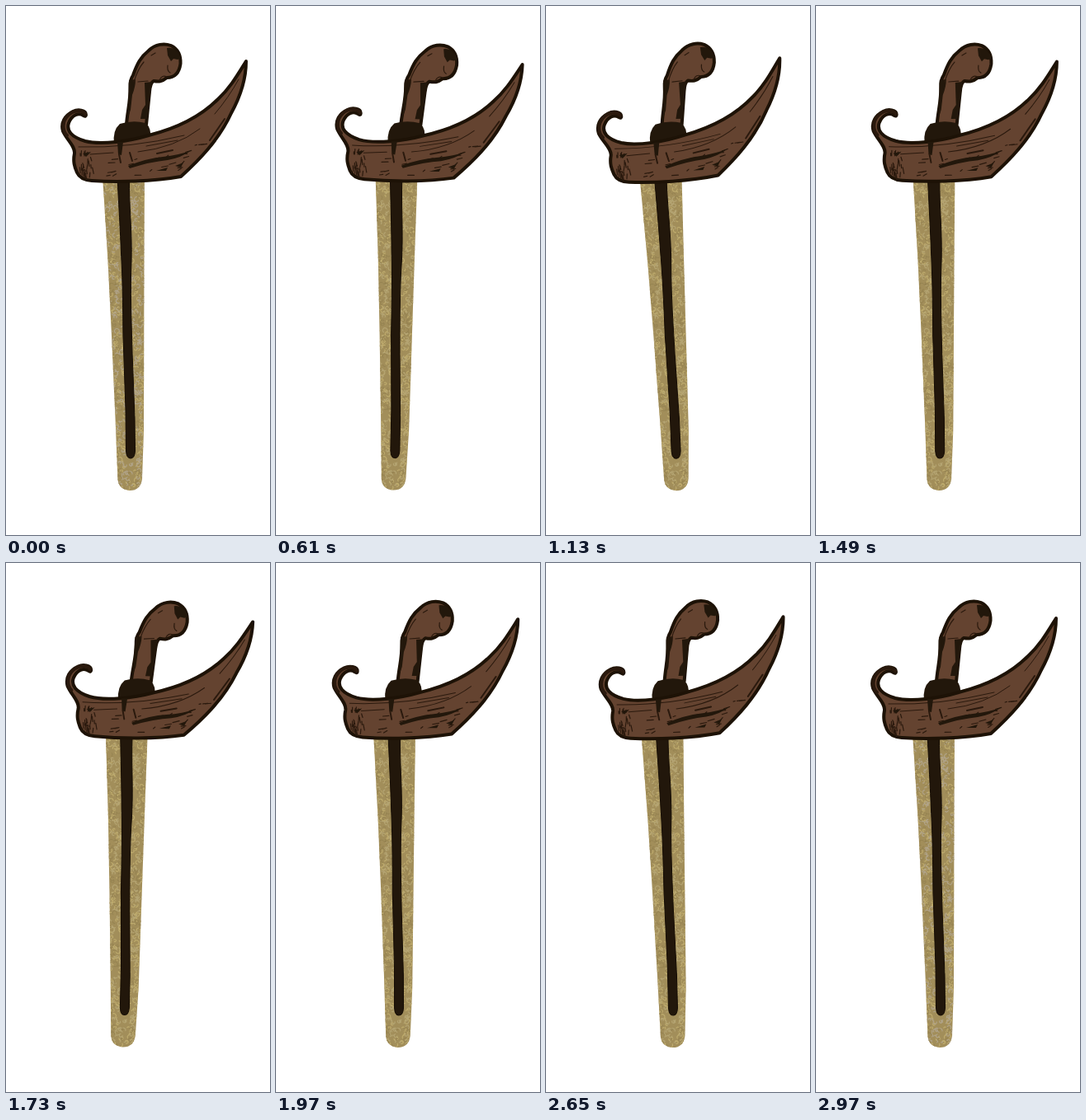
These frames come from a looping animation (320x642 px, 3010 ms). An HTML page:

```html
<!DOCTYPE html>
<html lang="en">
<head>
<meta charset="utf-8">
<title>Swaying kris</title>
<style>
  html, body { margin: 0; width: 100%; height: 100%; overflow: hidden; background: #fff; }
  svg { display: block; width: 100%; height: 100%; }
  .wood { fill: #644330; stroke: #1d1206; stroke-width: 4; stroke-linejoin: round; }
  .dark { fill: #22170b; }
  .line { fill: none; stroke: #2a190d; stroke-linecap: round; }
  .curl { fill: none; stroke-width: 1.1; stroke-linecap: round; }
</style>
</head>
<body>
<svg viewBox="0 0 320 642">
  <defs>
    <clipPath id="sheathClip"><use href="#sheath"/></clipPath>
    <clipPath id="guardClip"><use href="#guard"/></clipPath>
  </defs>
  <g id="kris">
    <path id="sheath" fill="#a28e5a" d="M117 205 L168 205 L167.500 300 L167 515 L165 574 Q163 588 150 588 Q137 587 135.500 575 L132.500 500 L128 400 L123.500 310Z"/>
    <g clip-path="url(#sheathClip)">
      <path id="gold" class="curl" stroke="#bfac6e"/>
      <path id="pale" class="curl"/>
      <path id="shade" class="curl" stroke="#978452"/>
    </g>
    <path class="dark" stroke="#160d04" d="M135 208 L149.500 208 C149 245 153 270 152 310 C150.500 345 152 380 153 420 L156 500 L156.500 540 Q156 549 151 549 Q146 549 145.500 540 L145 490 L142 400 C141.500 350 141 325 139.500 300 C138 260 136.500 240 135 208Z"/>

    <path class="wood" d="M146 144 C147 128 151 116 150.500 98 Q150 90 154 84 C159 70 163 62 173 54 C181 46 192 45 200 48 C208 52 212 60 211.500 70 C210 81 205 87 195 87 C189 92 185 92 179 91 Q175 93 174 104 L170 144Z"/>
    <g class="dark">
      <path d="M149 90 L157 89 Q157 98 153 108 L151 126 L148 135Z"/>
      <path d="M168 93 L177 92 L171 137 L163 137 L165 126 L169 120Z"/>
      <path d="M195 51 Q207 49 212 63 L208 65 L203 64 L200 67 L196 60Z"/>
      <path d="M138 143 Q154 138 169 142 Q177 148 175 163 L131 167 Q129 151 138 143Z"/>
    </g>
    <path class="line" stroke-width="1.200" d="M155 92 Q160 76 167 68 M186 90 Q189 83 195 86 M160 92 L172 91 M176 60 L181 57 M196 72 Q195 79 199 81"/>

    <path id="guard" class="wood" d="M97 132 C97 126 87 125 81 128 C71 133 66 142 69 152 C74 163 84 170 83 179 C81 189 83 195 86 202 Q90 211 104 212 C135 214 178 213 212 207 C233 188 258 163 273 130 C284 110 291 87 291 67 C281 83 272 99 257 113 C234 136 205 149 173 157 C150 164 115 169 96 164 C79 159 73 151 76 142 C80 132 88 129 94 133 Q97 135 97 132Z"/>
    <g clip-path="url(#guardClip)">
      <path id="scratch" class="line" stroke-width="1.200"/>
      <path class="line" stroke-width="1" d="M88 171 Q150 173 216 157 M160 177 Q205 172 235 149 M102 180 L130 178 M170 170 L208 163 M253 131 Q270 111 282 89"/>
      <path class="dark" d="M148 194 Q170 185 190 183 Q210 181 225 175 Q213 184 196 187 Q175 189 150 197Z M135 165 L142 165 L140 181 L136 180Z M182 200 L196 196 L194 200Z M93 179 L103 177 L97 183Z M205 194 L215 190 L212 196Z"/>
      <path class="line" stroke-width="2" d="M137 180 L139 190 M150 178 L153 188 M183 179 L202 175 M265 137 L247 163"/>
    </g>
    <path class="line" stroke-width="4" stroke="#1d1206" d="M96 131 C91 125 81 127 75 133 C68 140 68 151 74 157"/>
  </g>
</svg>
<script>
const $ = id => document.getElementById(id);

let seed = 7;
const rand = (lo, hi) => {
  seed = (seed * 16807) % 2147483647;
  return lo + (hi - lo) * seed / 2147483647;
};
const repeat = (n, part) => Array.from({ length: n }, part).join('');

// Small ornamental hooks covering the sheath
const curl = () => {
  const r = rand(1.2, 3), turn = rand(0, 6.28);
  const dx = 1.6 * r * Math.cos(turn), dy = 1.6 * r * Math.sin(turn);
  return `M${rand(117, 168)} ${rand(212, 588)}a${r} ${r} 0 ${seed % 2} 1 ${dx} ${dy}`;
};
$('gold').setAttribute('d', repeat(420, curl));
$('pale').setAttribute('d', repeat(420, curl));
$('shade').setAttribute('d', repeat(250, curl));

// Wood grain: upright nicks on the left, slanted ones along the lower edge
const nick = () => `M${rand(87, 106)} ${rand(174, 207)}l${rand(-1, 2)} ${rand(2, 8)}`;
const grain = () => {
  const x = rand(120, 238);
  return `M${x} ${rand(183, 208) - Math.max(0, x - 200) * 0.5}l${rand(2, 8)} ${rand(-3, 0)}`;
};
$('scratch').setAttribute('d', repeat(26, nick) + repeat(24, grain));

const STEP = 40, LOOP = 3010, SWING = 610;
// Steps after the hold, with the tilt in degrees
const keys = [[-1, 2], [14, -2], [28.5, 2], [43.3, -2], [59, 0]];

function tilt(t) {
  if (t < SWING) return Math.min(8, Math.floor(t / STEP)) * 0.25;
  const k = Math.min(59, Math.floor((t - SWING) / STEP));
  const i = keys.findIndex(key => k <= key[0]);
  const [k0, a0] = keys[i - 1], [k1, a1] = keys[i];
  const p = (k - k0) / (k1 - k0);
  const eased = i === keys.length - 1 ? 1 - (1 - p) ** 1.4 : p;
  return a0 + (a1 - a0) * eased;
}

function draw(now) {
  const a = tilt(now % LOOP);
  $('kris').setAttribute('transform', `rotate(${a} 160 321)`);
  $('pale').style.stroke = a ? '#b5a573' : '#b1a48a';
  requestAnimationFrame(draw);
}
draw(performance.now());
</script>
</body>
</html>
```
